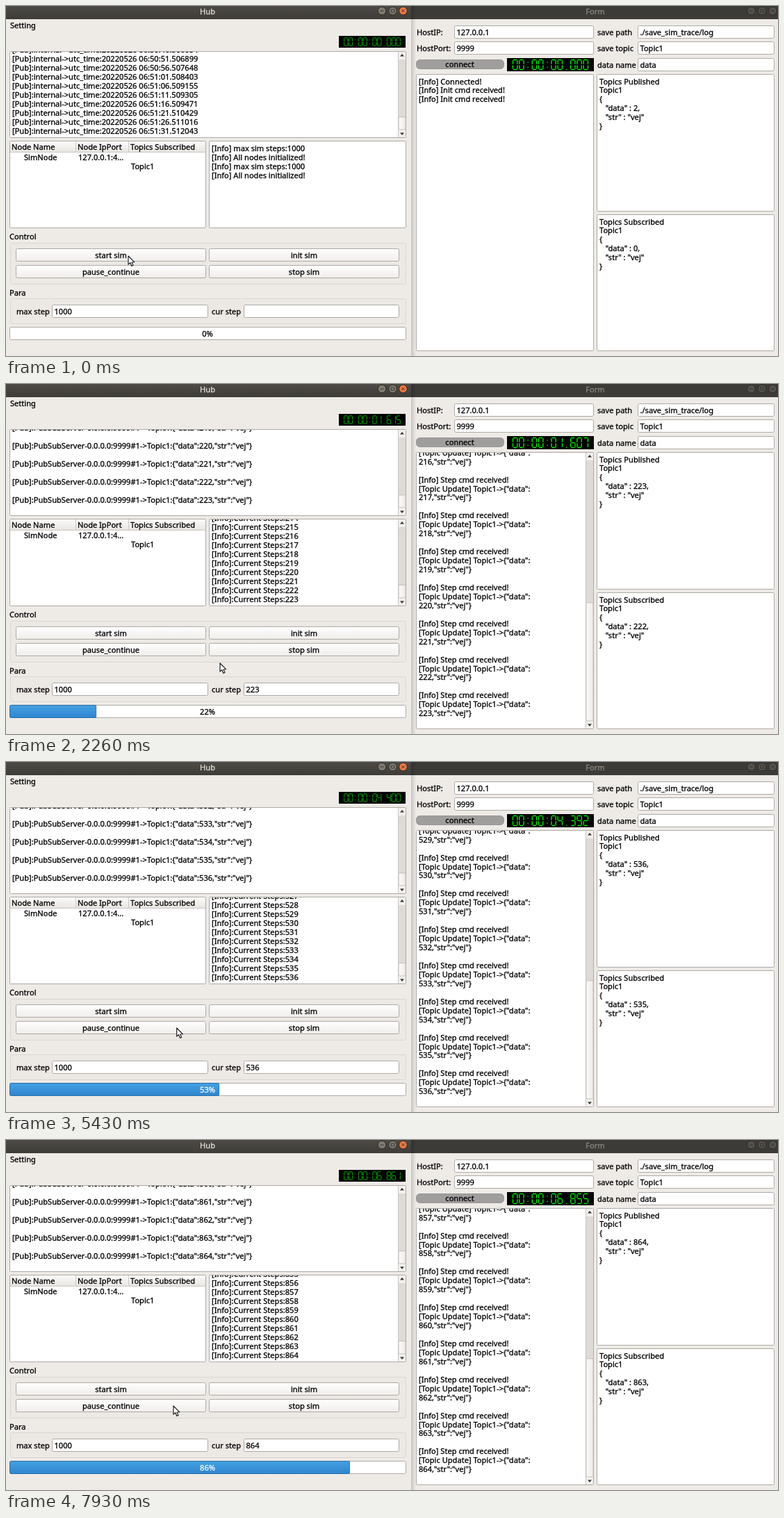
An HTML page with a canvas for the animation above (8 s loop, 1111 by 504 pixels).

```html
<!DOCTYPE html>
<html lang="en">
<head>
<meta charset="utf-8">
<title>Simulation hub</title>
<style>
html, body { margin: 0; width: 100%; height: 100%; overflow: hidden; background: #eeebe7; }
canvas { display: block; }
</style>
</head>
<body>
<canvas id="stage" width="1111" height="504"></canvas>
<script>
const c = document.getElementById('stage').getContext('2d');
const LOOP = 8000, LINE = 12.95, NAME = 'vej';
const BG = '#eeebe7', EDGE = '#aeaaa6';

// time, step, form clock, hub clock (ms); flat stretch is the pause
const RUN = [
  [340, 0, 0, 0], [880, 68, 528, 537], [2260, 223, 1607, 1615],
  [3580, 389, 3143, 3156], [4540, 498, 4084, 4092], [4780, 528, 4323, 4331],
  [5350, 528, 4323, 4331], [6260, 644, 5231, 5238], [7930, 864, 6855, 6861]
];
// time, x, y of the pointer
const PATH = [
  [260, 176, 360], [800, 182, 360], [1150, 182, 360], [1800, 308, 402],
  [2400, 308, 402], [3500, 305, 402], [3750, 305, 402], [4480, 249, 383],
  [5150, 249, 383], [5800, 241, 383]
];

function at(keys, t) {
  if (t <= keys[0][0]) return keys[0].slice(1);
  for (let i = 1; i < keys.length; i++) {
    const a = keys[i - 1], b = keys[i];
    if (t <= b[0]) {
      const p = (t - a[0]) / (b[0] - a[0]);
      return a.slice(1).map((v, j) => v + (b[j + 1] - v) * p);
    }
  }
  return keys[keys.length - 1].slice(1);
}

// The screen refreshes about every 69 ms
function tick(t) {
  if (t < 260) return 0;
  const late = t >= 5100, base = late ? 5840 : 260, gap = late ? 69.5 : 69.1;
  const s = base + Math.floor((t + 5 - base) / gap) * gap;
  return Math.min(7930, Math.round(s / 10) * 10);
}

// A hairline stroke gives the text its sturdier weight
function text(s, x, y, color = '#000', align = 'left', weight = 400) {
  c.font = weight + ' 11.1px "Noto Sans", "Open Sans", sans-serif';
  c.textAlign = align;
  c.fillStyle = c.strokeStyle = color;
  c.lineWidth = 0.3;
  c.fillText(s, x, y + 4);
  c.strokeText(s, x, y + 4);
}

function fill(x, y, w, h, color) {
  c.fillStyle = color;
  c.fillRect(x, y, w, h);
}

function shade(x0, y0, x1, y1, from, to) {
  const g = c.createLinearGradient(x0, y0, x1, y1);
  g.addColorStop(0, from);
  g.addColorStop(1, to);
  return g;
}

function box(x, y, w, h, color = '#fff', edge = EDGE, r = 1) {
  c.beginPath();
  c.roundRect(x + 0.5, y + 0.5, w - 1, h - 1, r);
  c.fillStyle = color;
  c.fill();
  c.strokeStyle = edge;
  c.lineWidth = 1;
  c.stroke();
}

function button(label, x, y, w, down) {
  const face = down ? '#d9d5d1' : shade(0, y, 0, y + 19, '#ffffff', '#f0edea');
  box(x, y, w, 19, face, EDGE, 2);
  text(label, x + w / 2, y + 9.5, '#000', 'center');
}

function field(label, lx, x, y, w, value) {
  text(label, lx, y + 9.5);
  box(x, y, w, 19, '#fff', EDGE, 2);
  text(value, x + 3.5, y + 9.5);
}

function triangle(x, y, d) {
  c.beginPath();
  c.moveTo(x - 3, y - 1.5 * d);
  c.lineTo(x + 3, y - 1.5 * d);
  c.lineTo(x, y + 2 * d);
  c.fillStyle = '#333';
  c.fill();
}

function scrollbar(right, y, h, share) {
  const x = right - 11, track = h - 23, len = track * share;
  fill(x, y + 1, 10, h - 2, '#dedad6');
  fill(x, y + 1, 10, 11, '#f3f1ef');
  fill(x, y + h - 12, 10, 11, '#f3f1ef');
  box(x - 0.5, y + h - 11.5 - len, 11, len, shade(x, 0, x + 10, 0, '#fbfaf9', '#efecea'), '#c3bfbb');
  fill(x - 1, y + 1, 1, h - 2, '#c9c5c1');
  triangle(x + 5, y + 6, -1);
  triangle(x + 5, y + h - 6, 1);
}

// Text view that sticks to its last line once it overflows
function log(x, y, w, h, lines, top, bottom, total = lines.length) {
  const rows = (h - 4) / LINE, over = lines.length > Math.floor(rows);
  box(x, y, w, h);
  c.save();
  c.beginPath();
  c.rect(x + 1, y + 1, w - 2, h - 2);
  c.clip();
  lines.forEach((s, i) => {
    const ly = over ? bottom - (lines.length - 1 - i) * LINE : top + i * LINE;
    if (s && ly > y - 9 && ly < y + h + 9) text(s, x + 4, ly);
  });
  c.restore();
  if (over) scrollbar(x + w, y, h, rows / total);
}

const SEGMENTS = [
  [0, 0, 1, 0], [1, 0, 1, 1], [1, 1, 1, 2], [0, 2, 1, 2], [0, 1, 0, 2], [0, 0, 0, 1], [0, 1, 1, 1]
];
const LIT = ['012345', '12', '01346', '01236', '1256', '02356', '023456', '012', '0123456', '012356'];

function lcd(x, y, w, h, ms, seg, weight, color) {
  fill(x, y, w, h, '#000');
  const s = '00:00:' + String(Math.floor(ms / 1000)).padStart(2, '0') +
    '.' + String(ms % 1000).padStart(3, '0');
  const pitch = seg * 1.2 - (seg < 7 ? 0.45 : 0);
  const left = x + (w - 12 * pitch + pitch - seg) / 2, top = y + (h - 2 * seg) / 2;
  const sx = seg - weight, sy = seg - weight / 2, half = weight / 2;
  c.strokeStyle = c.fillStyle = color;
  c.lineWidth = weight;
  [...s].forEach((ch, i) => {
    const cx = left + i * pitch;
    const mark = f => c.fillRect(cx + seg / 2 - half, top + seg * f - half, weight, weight);
    if (ch === ':') { mark(0.55); mark(1.5); return; }
    if (ch === '.') { mark(1.9); return; }
    c.beginPath();
    for (const k of LIT[ch]) {
      const [x0, y0, x1, y1] = SEGMENTS[k];
      const ix = (x1 - x0) * half, iy = (y1 - y0) * half;
      c.moveTo(cx + half + x0 * sx + ix, top + half + y0 * sy + iy);
      c.lineTo(cx + half + x1 * sx - ix, top + half + y1 * sy - iy);
    }
    c.stroke();
  });
}

function titleBar(x, w, label, mid, knobs, active) {
  fill(x, 0, w, 19, active ? shade(0, 0, 0, 19, '#4e4b46', '#3e3c37') : '#3d3b37');
  text(label, mid, 7.5, active ? '#e2ded6' : '#8a867e', 'center', 500);
  knobs.forEach((k, i) => {
    c.beginPath();
    c.arc(k, 7, 5.8, 0, 7);
    c.fillStyle = !active ? '#55524c' : i === 2 ? '#ee7843' : '#7f7a71';
    c.fill();
    c.strokeStyle = '#2e2c29';
    c.lineWidth = 1;
    c.stroke();
    c.strokeStyle = active ? '#3a3833' : '#34322f';
    c.beginPath();
    if (i === 0) { c.moveTo(k - 2.5, 7); c.lineTo(k + 2.5, 7); }
    if (i === 1) c.rect(k - 2.3, 5, 4.6, 4);
    if (i === 2) {
      c.moveTo(k - 2, 5); c.lineTo(k + 2, 9);
      c.moveTo(k + 2, 5); c.lineTo(k - 2, 9);
    }
    c.stroke();
  });
}

const json = n => '{"data":' + n + ',"str":"' + NAME + '"}';

const UTC = ['50:46.506054', '50:51.506899', '50:56.507648', '51:01.508403', '51:06.509155',
  '51:11.509305', '51:16.509471', '51:21.510429', '51:26.511016', '51:31.512043'
].map(s => '[Pub]:internal->utc_time:20220526 06:' + s);

function pubLines(n) {
  const out = n < 6 ? UTC.slice() : [];
  for (let i = Math.max(1, n - 6); i <= n; i++) {
    out.push('[Pub]:PubSubServer-0.0.0.0:9999#1->Topic1:' + json(i), '');
  }
  return out;
}

function stepLines(n) {
  const init = ['[Info] max sim steps:1000', '[Info] All nodes initialized!'];
  const out = [...init, ...init];
  for (let i = 1; i <= n; i++) out.push('[Info]:Current Steps:' + i);
  return out.slice(-50);
}

function formLines(n) {
  const out = n < 17 ? ['[Info] Connected!', '[Info] Init cmd received!', '[Info] Init cmd received!'] : [];
  for (let i = Math.max(1, n - 16); i <= n; i++) {
    const s = '[Topic Update] Topic1->' + json(i);
    out.push('[Info] Step cmd received!');
    if (i < 100) out.push(s);
    else out.push(s.slice(0, s.indexOf(':') + 1), s.slice(s.indexOf(':') + 1));
    out.push('');
  }
  return n < 17 ? out : out.slice(1);
}

function topic(y, h, title, n) {
  log(850, y, 256, h, [title, 'Topic1', '{', '   "data" : ' + n + ',',
    '   "str" : "' + NAME + '"', '}'], y + 10.5, 0);
}

function table() {
  box(5, 194, 283, 126);
  fill(6, 195, 281, 15, shade(0, 195, 0, 210, '#fcfbfa', '#e9e6e2'));
  fill(6, 210, 281, 1, '#cbc7c3');
  fill(100, 195, 1, 15, '#cbc7c3');
  fill(176, 195, 1, 15, '#cbc7c3');
  text('Node Name', 8, 203);
  text('Node IpPort', 103, 203);
  text('Topics Subscribed', 179, 203);
  text('SimNode', 26, 217.5);
  text('127.0.0.1:4...', 104, 217.5);
  text('Topic1', 180, 230.5);
}

function progress(n) {
  const pct = Math.floor(n / 10), w = 570 * pct / 100, label = pct + '%';
  box(5, 462, 571, 19, '#fff', EDGE, 2);
  text(label, 290, 471.5, '#000', 'center');
  if (!pct) return;
  c.save();
  c.beginPath();
  c.rect(5, 462, w, 19);
  c.clip();
  box(5, 462, w, 19, shade(0, 462, 0, 481, '#45a1e2', '#2f85cf'), '#2a6ca6', 2);
  text(label, 290, 471.5, '#fff', 'center');
  c.restore();
}

function pointer(x, y) {
  const pts = [[0, 0], [0, 12.2], [2.8, 9.7], [4.9, 14.5], [7, 13.6], [5, 9], [8.8, 8.8]];
  c.beginPath();
  pts.forEach(([px, py]) => c.lineTo(x + px, y + py));
  c.closePath();
  c.fillStyle = '#fff';
  c.fill();
  c.strokeStyle = '#111';
  c.lineWidth = 1.1;
  c.stroke();
}

function hub(t, n, ms) {
  titleBar(0, 583, 'Hub', 290, [541, 556.5, 571.5], true);
  text('Setting', 6, 27.5);
  lcd(479, 43, 96, 17, ms, 6.1, 0.9, '#00c400');
  log(5, 65, 571, 125, pubLines(n), 76, 180, 50);
  table();
  log(292, 194, 284, 126, stepLines(n), 205, 310);

  text('Control', 5, 332);
  box(6, 341, 570, 60, '#ece8e4', '#dad6d1', 2);
  button('start sim', 14, 349, 274, t >= 260 && t < 390);
  button('init sim', 292, 349, 274);
  button('pause_continue', 14, 373, 274, t >= 4680 && t < 4780 || t >= 5220 && t < 5340);
  button('stop sim', 292, 373, 274);

  text('Para', 5, 412.5);
  box(6, 421, 570, 37, '#ece8e4', '#dad6d1', 2);
  field('max step', 15, 66, 430, 225, '1000');
  field('cur step', 296, 342, 430, 224, n ? String(n) : '');
  progress(n);
}

function form(n, ms) {
  titleBar(583, 528, 'Form', 848, [1072.5, 1088, 1103.5], false);
  fill(583, 0, 7, 504, shade(583, 0, 590, 0, 'rgba(0,0,0,.17)', 'rgba(0,0,0,0)'));
  field('HostIP:', 591, 645, 28, 201, '127.0.0.1');
  field('HostPort:', 591, 645, 51, 201, '9999');
  field('save path', 851, 909, 28, 197, './save_sim_trace/log');
  field('save topic', 851, 909, 51, 197, 'Topic1');
  field('data name', 851, 909, 75, 197, 'data');
  box(590, 77, 127, 14, '#a09e9c', '#999795', 5);
  text('connect', 653, 84, '#000', 'center');
  lcd(721, 75, 125, 19, ms, 7.7, 1.4, '#00ee00');
  log(590, 98, 256, 399, formLines(n), 108.5, 487.2);
  topic(98, 198, 'Topics Published', n || 2);
  topic(300, 197, 'Topics Subscribed', Math.max(0, n - 1));
}

function draw(t) {
  const [n, formMs, hubMs] = at(RUN, t).map(v => Math.floor(v + 1e-6));
  fill(0, 0, 1111, 504, BG);
  hub(t, n, hubMs);
  form(n, formMs);
  pointer(...at(PATH, t));
}

c.lineJoin = 'round';
const start = performance.now();
function loop() {
  draw(tick((performance.now() - start) % LOOP));
  requestAnimationFrame(loop);
}
loop();
</script>
</body>
</html>
```
